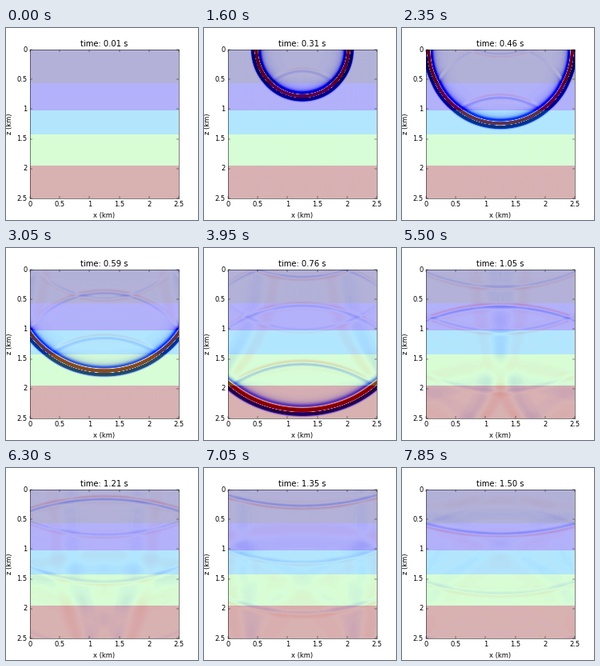
Write a matplotlib script that moves like this. It is 240 px wide and 240 px high and loops after 7900 ms.

```python
import numpy as np
import matplotlib.pyplot as plt
from matplotlib.animation import FuncAnimation

plt.style.use("classic")
plt.rcParams.update({
    "font.family": "DejaVu Sans",
    "font.size": 10,
    "axes.linewidth": 0.6,
    "savefig.dpi": "figure",
    "figure.facecolor": "white",
    "savefig.facecolor": "white",
})

FRAMES, STEP = 158, 0.0095      # snapshots and seconds between them
SUB = 12                        # solver steps per snapshot
SIZE, N, PAD = 2.5, 400, 40     # km, cells, absorbing cells
FREQ = 28.0                     # source wavelet
DELAY = 1.5 / FREQ
GAIN = 3.0                      # peak over colour limit at mid run
TOPS = [0.57, 1.02, 1.42, 1.95]
SPEEDS = 1.01 * np.array([3.0, 3.1, 3.3, 3.5, 4.0])


def layered(cells):
    z = (np.arange(cells) + 0.5) * SIZE / N
    return SPEEDS[np.searchsorted(TOPS, z)]


def ricker(t):
    a = (np.pi * FREQ * (t - DELAY)) ** 2
    return (1 - 2 * a) * np.exp(-a)


def sponge(cells):
    depth = np.clip(np.arange(cells + 4) - (cells + 1 - PAD), 0, PAD)
    return np.exp(-(0.0052 * depth) ** 2)


def simulate():
    """SH waves in the right half of a symmetric, layered section."""
    nz, nx = N + PAD, N // 2 + PAD
    dt = STEP / SUB
    speed = layered(nz)
    mu = np.pad(speed ** 2, 1, mode="edge") * (dt * N / SIZE) ** 2
    mid = mu[1:-1]
    below = ((mu[2:] - mid) / 2)[:, None].astype("f4")
    above = ((mu[:-2] - mid) / 2)[:, None].astype("f4")
    mid = mid[:, None].astype("f4")
    courant = np.pad(speed, 2, mode="edge") * dt * N / SIZE
    damp = np.outer(sponge(nz), sponge(nx)).astype("f4")

    old = np.zeros((nz + 4, nx + 4), "f4")
    u, new = old.copy(), old.copy()
    shots = []
    for n in range(FRAMES * SUB):
        c = u[2:-2, 2:-2]
        up, down = u[1:-3, 2:-2], u[3:-1, 2:-2]
        near = up + down + u[2:-2, 1:-3] + u[2:-2, 3:-1]
        far = u[:-4, 2:-2] + u[4:, 2:-2] + u[2:-2, :-4] + u[2:-2, 4:]
        new[2:-2, 2:-2] = (2 * c - old[2:-2, 2:-2]
                           + mid * (near * (4 / 3) - far / 12 - 5 * c)
                           + below * (down - c) + above * (up - c))
        new[2, 2] += ricker(n * dt)
        # outgoing waves leave through the side and the bottom
        for k in (-2, -1):
            new[:, k] = u[:, k] - courant * (u[:, k] - u[:, k - 1])
            new[k] = u[k] - courant[k] * (u[k] - u[k - 1])
        # free surface and symmetry axis
        new[1], new[0] = new[2], new[3]
        new[:, 1], new[:, 0] = new[:, 2], new[:, 3]
        new *= damp
        u *= damp
        old, u, new = u, new, old
        if (n + 1) % SUB == 0:
            half = u[2:2 + N, 2:2 + N // 2]
            shots.append(np.hstack([half[:, ::-1], half]))
    return np.array(shots)


waves = simulate()
waves *= GAIN / np.abs(waves[61]).max()

fig = plt.figure(figsize=(4, 4), dpi=60)
ax = fig.add_axes([0.125, 0.1, 0.775, 0.8])
box = (0, SIZE, SIZE, 0)
field = ax.imshow(waves[0], cmap="seismic", vmin=-1, vmax=1, extent=box)
ax.imshow(layered(N)[:, None], cmap="jet", alpha=0.3, extent=box,
          interpolation="nearest")
ticks = np.arange(0, 2.6, 0.5)
names = [f"{t:g}" for t in ticks]
ax.set_xticks(ticks, names)
ax.set_yticks(ticks, names)
ax.set_xlabel("x (km)")
ax.set_ylabel("z (km)")
title = ax.set_title("")


def draw(i):
    field.set_data(waves[i])
    title.set_text(f"time: {(i + 1) * STEP:.2f} s")
    return field, title


anim = FuncAnimation(fig, draw, frames=FRAMES, interval=50, repeat=True)
plt.show()
```
